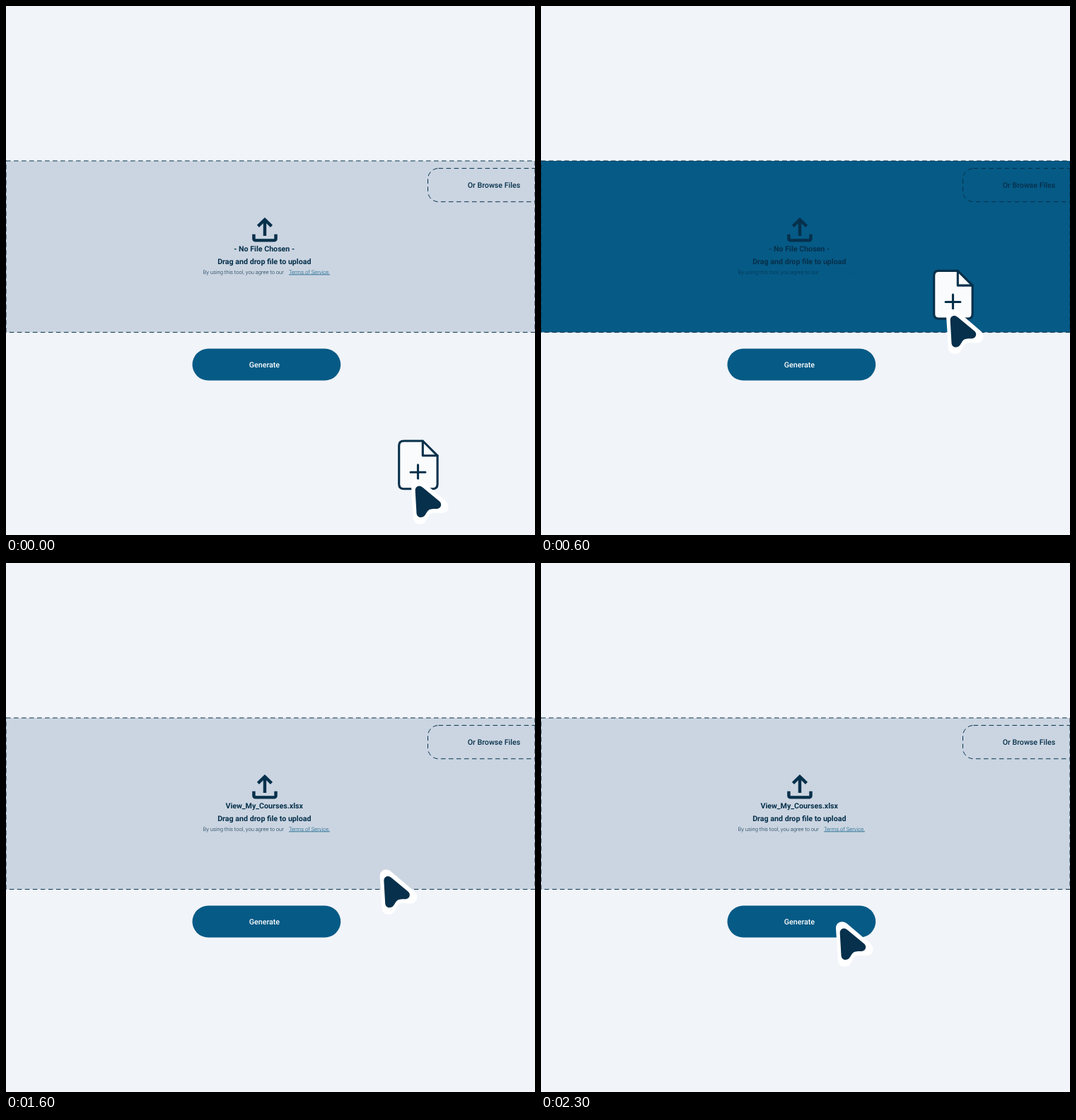
These frames come from a looping animation (748 by 748 pixels, 2800 ms). An HTML page:

```html
<!DOCTYPE html>
<html lang="en">
<head>
<meta charset="utf-8">
<title>File upload</title>
<style>
  html, body { margin: 0; width: 100%; height: 100%; overflow: hidden; background: #f1f4f9; }
  svg { display: block; width: 100%; height: 100%; }
  text { font: 500 10.66px Roboto, sans-serif; fill: #06304b; text-anchor: middle; text-rendering: geometricPrecision; }
  .bold { font-weight: 700; }
  .small { font-size: 7.63px; font-weight: 300; }
  .link { fill: #065a86; text-decoration: underline; }
  .dash { fill: none; stroke: #06304b; stroke-width: 1; }
  .line { fill: none; stroke: #06304b; stroke-width: 3.1; stroke-linecap: round; stroke-linejoin: round; }
</style>
</head>
<body>
<svg viewBox="0 0 748 748">
  <rect width="748" height="748" fill="#f1f4f9"/>

  <rect id="panel" y="219" width="748" height="242.4"/>
  <rect class="dash" x="0" y="219" width="748" height="242.4" stroke-dasharray="6.6 4.4"/>
  <rect class="dash" x="596.5" y="229.6" width="190" height="47.2" rx="15" stroke-dasharray="6.6 4.4"/>
  <text x="690" y="257.2">Or Browse Files</text>

  <path transform="translate(339.3 290.2) scale(2.22 2.17)" fill="#06304b"
    d="M11 16V7.85L8.4 10.45 7 9l5-5 5 5-1.4 1.45L13 7.85V16ZM6 20q-.82 0-1.41-.59T4 18V15H6v3h12v-3h2v3q0 .82-.59 1.41T18 20Z"/>
  <text id="name" class="bold" x="365.2" y="346.8"></text>
  <text class="bold" x="365.3" y="364.9">Drag and drop file to upload</text>
  <text class="small" x="335.7" y="378.5">By using this tool, you agree to our</text>
  <text class="small link" x="428.9" y="378.5">Terms of Service.</text>

  <rect x="263.5" y="484.5" width="209.7" height="45" rx="22.5" fill="#065a86"/>
  <text x="365.4" y="510.8" style="fill:#fff">Generate</text>

  <g id="pointer">
    <g id="file">
      <path class="line" style="fill:#fafbfd" d="M589.3 350H562.5Q555.7 350 555.7 356.8V411Q555.7 417.8 562.5 417.8H603.3Q610.1 417.8 610.1 411V370.8Z"/>
      <path class="line" d="M589.3 350V370.8H610.1M582.5 383.8V404.6M572.1 394.2H592.9"/>
    </g>
    <path fill="#fff" d="M573 414C572.6 405 582 401.4 588.8 407L622 435.3C628.8 441.4 625 452.2 616.5 452.2L606.5 451.6C601 451.4 598.8 453.4 596.8 457.6L594 463C589 471 576.6 468.8 576 459.5Z"/>
    <path fill="#06304b" d="M578.7 420.5C578.4 413.8 584.5 411.7 589.2 415.7L612.8 435.2C617.4 439.2 614.8 445.6 609.5 445.9L604.5 446C599.3 446.2 597 447.6 594.8 451.3L592.6 454.8C589 460 581 458.8 580.5 452.3Z"/>
  </g>
</svg>
<script>
const LOOP = 2800, STEP = 100;
const el = id => document.getElementById(id);
const panel = el("panel"), label = el("name"), file = el("file"), pointer = el("pointer");

const part = (t, from, to) => Math.min(1, Math.max(0, (t - from) / (to - from)));

// Offset from the drop spot inside the panel.
function place(t) {
  if (t < 1500) return [0, 265 - 192 * part(t, 0, 400) - 73 * part(t, 400, 700)];
  const p = part(t, 1500, 1852);
  const press = t >= 2100 && t < 2300;
  return [-156 * p - (press ? 17 : 0), 103 * p - (press ? 16 : 0)];
}

function draw(ms) {
  const t = Math.floor((ms % LOOP) / STEP) * STEP;
  const hover = t >= 400 && t < 1400;
  panel.setAttribute("fill", hover ? "#065a86" : "#cbd5e1");
  label.textContent = t < 1400 ? "- No File Chosen -" : "View_My_Courses.xlsx";
  file.setAttribute("opacity", 1 - part(t, 700, 900));
  pointer.setAttribute("transform", `translate(${place(t)})`);
}

const start = performance.now();
function tick() {
  draw(performance.now() - start);
  requestAnimationFrame(tick);
}
tick();
</script>
</body>
</html>
```
